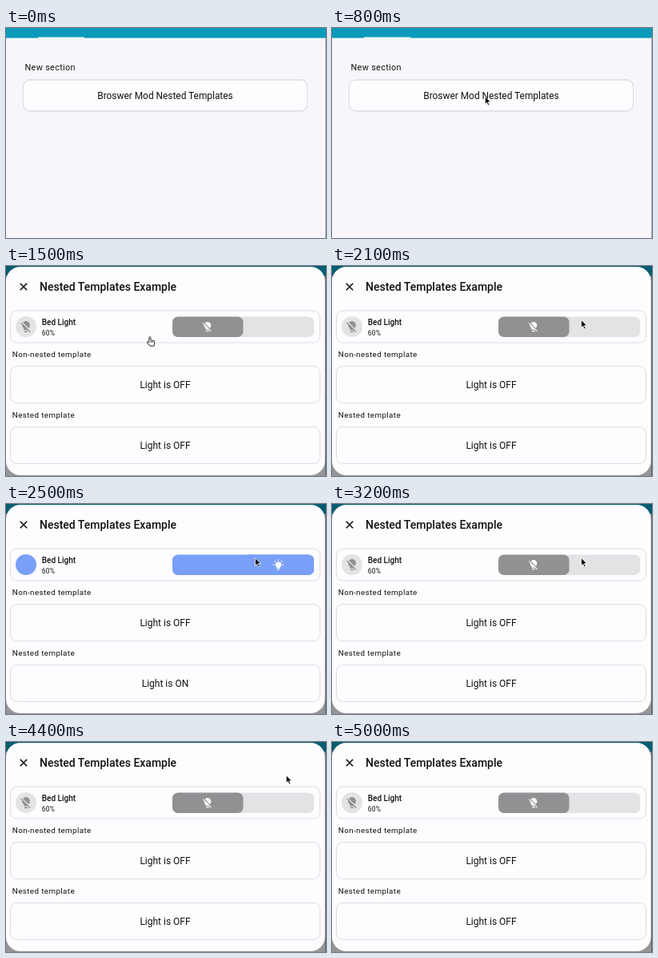
An HTML page that plays this animation: 400 px wide and 263 px high, repeating every 5300 ms.

```html
<!DOCTYPE html>
<html lang="en">
<head>
<meta charset="utf-8">
<style>
  html, body { margin: 0; width: 100%; height: 100%; overflow: hidden; background: #f8f6fa; }
  svg { display: block; width: 400px; height: 263px; font-family: Roboto, sans-serif; fill: #111; }
  .card { fill: #fdfcff; stroke: #dddce1; }
  .label { font-size: 9.8px; letter-spacing: .4px; }
  .mid { font-size: 12px; text-anchor: middle; }
</style>
</head>
<body>
<svg viewBox="0 0 400 263">
  <defs>
    <radialGradient id="ripple">
      <stop offset=".6" stop-color="#dbd9dc"/>
      <stop offset="1" stop-color="#dbd9dc" stop-opacity="0"/>
    </radialGradient>
    <clipPath id="button"><rect x="21.5" y="65" width="355" height="39" rx="8"/></clipPath>
    <clipPath id="track"><rect x="208" y="63.5" width="177" height="25.5" rx="7"/></clipPath>
    <path id="bulb" d="M12 2A7 7 0 0 0 5 9C5 11.4 6.2 13.5 8 14.7V17A1 1 0 0 0 9 18H15A1 1 0 0 0 16 17V14.7C17.8 13.5 19 11.4 19 9A7 7 0 0 0 12 2M9 21A1 1 0 0 0 10 22H14A1 1 0 0 0 15 21V20H9Z"/>
    <path id="bulbOff" d="M12 2C9.8 2 7.8 3 6.5 4.7L16.3 14.5C17.9 13.2 19 11.2 19 9A7 7 0 0 0 12 2M3.3 4L2 5.3L5 8.3V9C5 11.4 6.2 13.5 8 14.7V17A1 1 0 0 0 9 18H14.7L18.7 22L20 20.7ZM9 20V21A1 1 0 0 0 10 22H14A1 1 0 0 0 15 21V20Z"/>
    <path id="bulbOn" d="M12 6A6 6 0 0 1 18 12C18 14.2 16.8 16.2 15 17.2V19A1 1 0 0 1 14 20H10A1 1 0 0 1 9 19V17.2C7.2 16.2 6 14.2 6 12A6 6 0 0 1 12 6M14 21V22A1 1 0 0 1 13 23H11A1 1 0 0 1 10 22V21ZM20 11H23V13H20ZM1 11H4V13H1ZM13 1V4H11V1ZM4.9 3.5L7 5.6L5.6 7L3.5 4.9ZM17 5.6L19.1 3.5L20.5 4.9L18.4 7Z"/>
  </defs>

  <rect width="400" height="263" fill="#f8f6fa"/>
  <rect width="400" height="12.5" fill="#0b9aba"/>
  <rect x="40" y="11.5" width="58" height="1.5" fill="#fff"/>
  <rect x="399" y="13" width="1" height="250" fill="#aaa9ac"/>
  <text x="23.5" y="53" font-size="10.8" letter-spacing=".36">New section</text>
  <rect class="card" x="21.5" y="65" width="355" height="39" rx="8"/>
  <g clip-path="url(#button)"><circle id="wave" cx="180" cy="84" fill="url(#ripple)"/></g>
  <rect x="21.5" y="65" width="355" height="39" rx="8" fill="none" stroke="#dddce1"/>
  <text class="mid" x="199" y="88.5" style="font-size:11.9px">Broswer Mod Nested Templates</text>

  <rect id="shade" width="400" height="263" fill="#000"/>
  <g id="dialog">
    <rect y="1" width="398.7" height="261" rx="18" fill="#fdfcff"/>
    <path d="M17.8 21.8l8.4 8.4m0-8.4l-8.4 8.4" stroke="#111" stroke-width="1.6"/>
    <text x="42" y="30.5" font-size="14" font-weight="500">Nested Templates Example</text>
    <rect class="card" x="5.5" y="56" width="387" height="40" rx="8"/>
    <circle id="badge" cx="25" cy="76" r="13"/>
    <use id="badgeIcon" transform="translate(16.6 67.6) scale(.7)"/>
    <text x="44.8" y="74.3" font-size="10" font-weight="500">Bed Light</text>
    <text x="44.8" y="87" font-size="8.4" letter-spacing=".3">60%</text>
    <g clip-path="url(#track)">
      <rect id="rail" x="208" y="63" width="177" height="26"/>
      <rect id="flood" x="208" y="63" width="177" height="26"/>
    </g>
    <rect id="thumb" y="63.5" width="88.5" height="25.5" rx="7"/>
    <use id="thumbIcon" fill="#fff"/>
    <text class="label" x="7.8" y="114.3">Non-nested template</text>
    <rect class="card" x="5.5" y="125.5" width="387" height="46" rx="8"/>
    <text class="mid" x="199" y="153">Light is OFF</text>
    <text class="label" x="7.8" y="189.8">Nested template</text>
    <rect class="card" x="5.5" y="201.5" width="387" height="46" rx="8"/>
    <text class="mid" id="nested" x="199" y="228.5"></text>
  </g>

  <path id="arrow" d="M0 0V9.6L2.2 7.6L3.8 11.2L5.5 10.4L3.9 7H7Z" fill="#000" stroke="#fff" stroke-width=".8"/>
  <path id="hand" d="M-1.6 6V.8Q-.6-.8.4.8V4.4L4.4 5.2Q5.6 5.6 5.4 7L4.6 11.6H-.8L-4 7.4Q-4 5.6-2.6 6.2L-1.6 7.4ZM1.2 5.6V7.4M3.2 6V7.6" fill="#fff" stroke="#222" stroke-width="1" stroke-linejoin="round"/>
</svg>
<script>
const LOOP = 5300, STEP = 100;
const $ = id => document.getElementById(id);
const set = (id, attrs) => { for (const k in attrs) $(id).setAttribute(k, attrs[k]); };
const clamp = v => Math.max(0, Math.min(1, v));

// Pointer path: time, x, y
const path = [
  [100, 392, 224], [200, 272, 220], [300, 272, 220], [500, 202, 83],
  [600, 202, 83], [1000, 180.5, 88.5], [1800, 180.5, 88.5], [1900, 205, 85],
  [2100, 311.5, 67.5], [4300, 311.5, 67.5], [4500, 389, 16]
];
const clicks = [2300, 3000, 3500, 4100];
const gray = { main: '#929093', pale: '#e4e2e5' };
const blue = { main: '#7a9ff8', pale: '#dfe6fb' };

function pointer(t) {
  const i = path.findIndex(p => p[0] >= t);
  if (i < 0 || t < path[0][0]) return null;
  const b = path[i], a = path[i - 1] || b;
  const k = a === b ? 0 : (t - a[0]) / (b[0] - a[0]);
  return [a[1] + (b[1] - a[1]) * k, a[2] + (b[2] - a[2]) * k];
}

function drawSwitch(t) {
  const n = clicks.filter(c => c <= t).length;
  const toOn = n % 2 === 1;
  const k = n ? (t - clicks[n - 1]) / STEP : 9;
  const on = k < 1 ? !toOn : toOn;
  const color = on ? blue : gray;
  const moved = clamp((k + 1) * .4);
  const x = 208 + 88.5 * (toOn ? moved : 1 - moved);
  const flood = (toOn ? [0, .5, 1, .5] : [0, .3])[k] || 0;

  set('rail', { fill: color.pale });
  set('flood', { fill: color.main, opacity: flood });
  set('thumb', { x, fill: color.main });
  set('thumbIcon', {
    href: on ? '#bulbOn' : '#bulbOff',
    transform: `translate(${x + 36.5} 68.7) scale(.62)`
  });
  set('badge', { fill: flood === 1 ? color.main : color.pale });
  set('badgeIcon', { href: on ? '#bulb' : '#bulbOff', fill: color.main });
  $('nested').textContent = 'Light is ' + (on ? 'ON' : 'OFF');
}

function draw(now) {
  const t = Math.floor(now % LOOP / STEP) * STEP;
  const open = clamp((t - 1300) / 200);
  set('wave', { r: t < 1200 ? 0 : t < 1300 ? 89 : 165 });
  set('shade', { opacity: open * .4 });
  set('dialog', { opacity: open, transform: `translate(0 ${(1 - open) * 10})` });
  drawSwitch(t);

  const p = pointer(t), hand = t >= 1400 && t < 2000;
  for (const id of ['arrow', 'hand']) {
    const shown = p && hand === (id === 'hand');
    set(id, { visibility: shown ? 'visible' : 'hidden' });
    if (shown) set(id, { transform: `translate(${p[0]} ${p[1]})` });
  }
}

let start;
function tick(now) {
  start ??= now;
  draw(now - start);
  requestAnimationFrame(tick);
}
draw(0);
requestAnimationFrame(tick);
</script>
</body>
</html>
```
